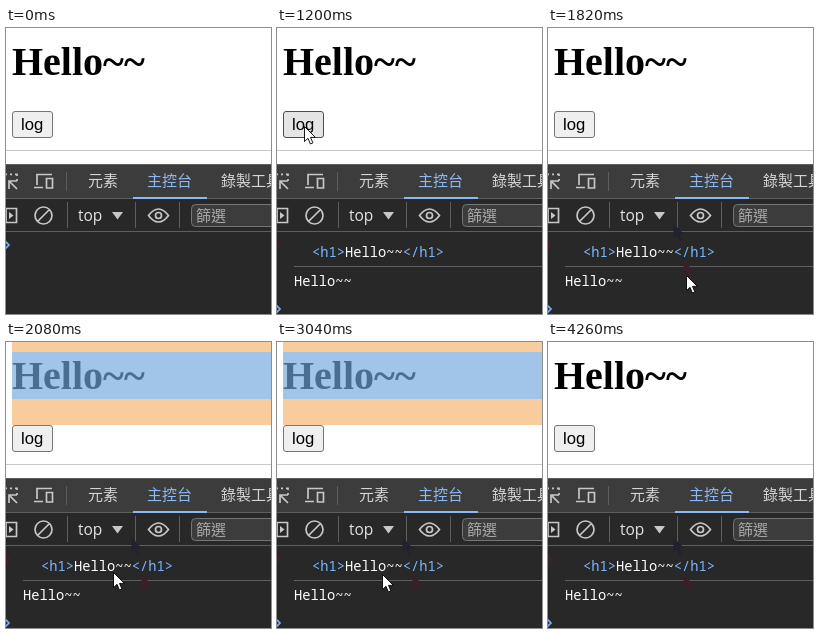
Write an HTML page that moves like this. It is 265 px wide and 286 px high and loops after 4600 ms.

```html
<!DOCTYPE html>
<html lang="zh-Hant">
<head>
<meta charset="utf-8">
<title>Console log demo</title>
<style>
  html, body { margin: 0; width: 100%; height: 100%; overflow: hidden; background: #fff; }
  svg { display: block; width: 100%; height: 100%; }
  text { white-space: pre; }
  .title { font: bold 40px "Liberation Serif", "Times New Roman", serif; }
  .button { font: 16.67px "Liberation Sans", Arial, sans-serif; }
  .ui { font: 15px "Noto Sans CJK TC", "Noto Sans CJK", "Noto Sans CJK JP", sans-serif; fill: #d5d5d5; }
  .latin { font: 15.5px "Open Sans", "Noto Sans", sans-serif; fill: #e3e3e3; }
  .mono { font: 500 13.75px "Noto Sans Mono", "DejaVu Sans Mono", monospace; fill: #fff; }
  .blue { fill: #7cb7ff; }
  .accent { fill: #8ab9f5; }
  .icon { fill: none; stroke: #c7c7c7; stroke-width: 1.7; }
  .rule { stroke: #5e5e5e; }
  .chevron { fill: none; stroke-width: 1.7; }
</style>
</head>
<body>
<svg viewBox="0 0 265 286" preserveAspectRatio="none">
  <defs>
    <path id="arrow" d="M.5 .5V15.6L4 12.3L6.4 18L8.9 16.9L6.5 11.4H11.4Z"/>
    <path id="chevron" d="M-1 -4L3 0L-1 4"/>
  </defs>

  <!-- page -->
  <rect width="265" height="286" fill="#fff"/>
  <text class="title" x="6" y="47">Hello~~</text>
  <g id="highlight">
    <path d="M6 0H265V10H6ZM6 57H265V83H6Z" fill="#f6b26b" fill-opacity=".66"/>
    <path d="M6 10H265V57H6Z" fill="#6fa8dc" fill-opacity=".66"/>
  </g>
  <rect id="button" x="6.5" y="83.5" width="40" height="26" rx="2.5"/>
  <text class="button" x="15" y="102">log</text>
  <path d="M0 122.5H265" stroke="#c8c8c8"/>

  <!-- developer tools -->
  <rect y="136" width="265" height="35" fill="#3c3c3c"/>
  <rect y="171" width="265" height="115" fill="#282828"/>
  <path class="rule" d="M0 136.5H265M0 170.5H265M0 203.5H265M60.5 144V163M61.5 174V200M129.5 174V200M173.5 174V200"/>
  <path class="icon" d="M0 146.3H1M4 146.3H6M9 146.3H11V148M11 151V153M3 161V153H11M3.5 153.5L11 161"/>
  <path class="icon" d="M31 157V146.5H46M28 159.5H37M40.5 150.5H46.5V160H40.5Z"/>
  <text class="ui" x="82" y="158">元素</text>
  <text class="ui accent" x="141" y="158">主控台</text>
  <text class="ui" x="215" y="158">錄製工具</text>
  <rect class="accent" x="127" y="169" width="74" height="2"/>

  <path class="icon" d="M-4 180.5H10.5V194.5H-4M0 180V195"/>
  <path d="M3 184L7.5 187.5L3 191Z" fill="#c7c7c7"/>
  <path class="icon" d="M46 187.5A8.5 8.5 0 1 1 29 187.5A8.5 8.5 0 1 1 46 187.5M31.5 193.5L43.5 181.5"/>
  <text class="latin" x="72" y="193">top</text>
  <path d="M106 184H117L111.5 191.5Z" fill="#c7c7c7"/>
  <path class="icon" d="M142.5 187.5Q152.5 174.5 162.5 187.5Q152.5 200.5 142.5 187.5Z"/>
  <circle class="icon" cx="152.5" cy="187.5" r="3"/>
  <rect x="185.5" y="176.5" width="100" height="22" rx="4" fill="#3c3c3c" stroke="#757575"/>
  <text class="ui" x="190" y="193" style="fill:#a8a8a8">篩選</text>

  <g id="output">
    <use href="#chevron" y="217" class="chevron" stroke="#4a2028"/>
    <text class="mono" x="35" y="229"><tspan class="blue">&lt;h1&gt;</tspan>Hello~~<tspan class="blue">&lt;/h1&gt;</tspan></text>
    <path class="rule" d="M17 238.5H265"/>
    <text class="mono" x="17" y="258">Hello~~</text>
  </g>
  <use id="prompt" href="#chevron" class="chevron" stroke="#7cacf8"/>

  <!-- faint trail left by the pointer -->
  <g id="trail">
    <use href="#arrow" x="125" y="195" fill="#20222f"/>
    <use href="#arrow" x="135" y="232" fill="#3a1f2c"/>
  </g>
  <use id="pointer" href="#arrow" fill="#fff" stroke="#000" stroke-width=".9"/>
</svg>
<script>
const LOOP = 4600;
const STEP = 70;
const ENTER = 130, EXIT = 4260;
const PRESS = 1060, LOGGED = 1130, RELEASE = 1200;

const el = id => document.getElementById(id);
const show = (id, on) => el(id).setAttribute("visibility", on ? "visible" : "hidden");
const within = (v, from, to) => v >= from && v < to;

// Each move bends towards `via` and starts where the previous one ended.
const entry = [132, 195];
const moves = [
  { start: ENTER, end: 590, via: [62, 112], to: [24, 92] },
  { start: 590, end: 800, via: [25, 95], to: [27, 98] },
  { start: 1470, end: 1820, via: [151, 193], to: [138, 247] },
  { start: 1880, end: 2080, via: [122, 222], to: [107, 230] },
  { start: 2480, end: 2620, via: [108, 246], to: [110, 263] },
  { start: 2620, end: 3040, via: [114, 237], to: [105, 232] },
  { start: 3630, end: 4190, via: [177, 214], to: [236, 276] }
];

const bend = (a, b, c, u) => (1 - u) ** 2 * a + 2 * u * (1 - u) * b + u * u * c;

// Progress of a move, held between evenly spaced steps.
function progress({ start, end }, t) {
  const steps = Math.round((end - start) / STEP);
  const done = Math.floor((t - start) / (end - start) * steps + 1e-6);
  return Math.min(1, done / steps);
}

function pointerAt(t) {
  let from = entry;
  for (const move of moves) {
    if (t < move.start) break;
    const u = progress(move, t);
    from = from.map((v, i) => Math.round(bend(v, move.via[i], move.to[i], u)));
  }
  return from;
}

function buttonColors(t, overButton) {
  if (within(t, PRESS, RELEASE)) return ["#f5f5f5", "#8d8d8d"];
  return overButton ? ["#e5e5e5", "#4f4f4f"] : ["#efefef", "#767676"];
}

function draw(t) {
  const [x, y] = pointerAt(t);
  const visible = within(t, ENTER, EXIT);
  const overButton = visible && within(x, 6, 47) && within(y, 83, 110);
  const [fill, stroke] = buttonColors(t, overButton);
  el("button").setAttribute("fill", fill);
  el("button").setAttribute("stroke", stroke);
  el("pointer").setAttribute("transform", `translate(${x} ${y})`);
  el("prompt").setAttribute("y", t < LOGGED ? 217 : 281);
  show("pointer", visible);
  show("output", t >= LOGGED);
  show("highlight", within(t, 1950, 2620) || within(t, 2900, 4050));
  show("trail", t >= 1820);
}

const start = performance.now();
function tick() {
  draw((performance.now() - start) % LOOP);
  requestAnimationFrame(tick);
}
tick();
</script>
</body>
</html>
```
